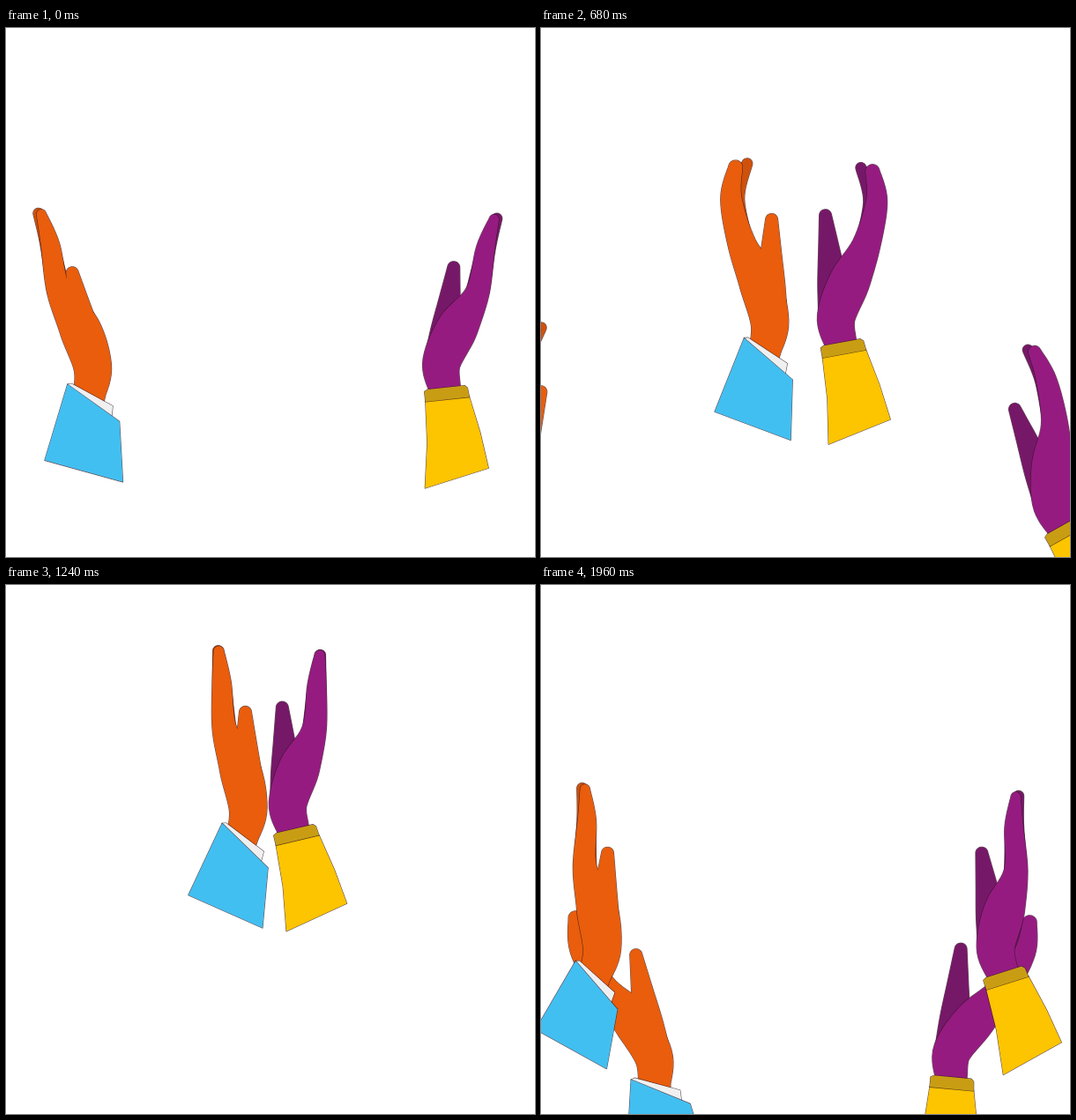
Write an HTML page with a canvas that moves like this. It is 600 px wide and 600 px high and loops after 2000 ms.

```html
<!DOCTYPE html>
<html lang="en">
<head>
<meta charset="utf-8">
<title>Clapping hands</title>
<style>
html, body { margin: 0; width: 100%; height: 100%; overflow: hidden; background: #fff; }
canvas { display: block; width: 600px; height: 600px; }
</style>
</head>
<body>
<canvas id="stage" width="600" height="600"></canvas>
<script>
const ctx = document.getElementById('stage').getContext('2d');
const SIZE = 600, LOOP = 2000, STEP = 40;
const EDGE = 'rgba(45,20,30,.75)';
const BONES = [32, 46, 48, 53, 36];

// Path of the left wrist. tilt turns the whole arm, drag curls the fingers.
const KEYS = [
  { t: 320, x: -140, y: 730, tilt: 43, drag: 1 },
  { t: 520, x: -60, y: 593, tilt: 43, drag: 1 },
  { t: 760, x: -36, y: 529, tilt: 43, drag: 0.4 },
  { t: 840, x: 1, y: 494, tilt: 39, drag: 0.2 },
  { t: 960, x: 61, y: 443, tilt: 29, drag: 0 },
  { t: 1040, x: 130, y: 387, tilt: 4.5, drag: 0 },
  { t: 1280, x: 275, y: 280, tilt: 26, drag: 0.2 },
  { t: 1480, x: 272, y: 326, tilt: 28, drag: 0.9 },
  { t: 1520, x: 272, y: 326, tilt: 28, drag: 0.9 },
  { t: 1760, x: 237, y: 400, tilt: 15, drag: 1 },
  { t: 1960, x: 129, y: 566, tilt: 2, drag: 1 },
  { t: 2120, x: -10, y: 700, tilt: -4, drag: 1 }
];

// Cuffs are drawn around the wrist, both as left hands
const orange = {
  skin: '#e95d0c', shade: '#cf510c', thumb: '#e95d0c',
  reach: 1, lean: -32, thumbTurn: 0,
  offset: () => [0, 0],
  cuffTilt: tilt => tilt,
  cuff: [
    ['#f0f0f0', [[-27, -4], [-23, -6], [29, 6], [31, 18], [13, 20]]],
    ['#42bff1', [[-27, -4], [41, 21], [63, 86], [-29, 86]]]
  ]
};

const purple = {
  skin: '#951b81', shade: '#761868', thumb: '#761868',
  reach: 0.95, lean: -38, thumbTurn: 5, mirror: true,
  offset: u => {
    const early = Math.max(0, Math.min(1, (1010 - u) / 250));
    return [6 + 48 * early, 22 * early - 7];
  },
  cuffTilt: tilt => 0.85 * tilt - 7,
  cuff: [
    ['#fdc400', [[23, 12], [-27, 12], [-35, 54], [-40, 95], [34, 110], [26, 59]]],
    ['#c99d13', [[23, 1], [19, -1], [-23, -1], [-26, 2], [-27, 12.5], [23, 12.5]]]
  ]
};

// Cubic through the keys that never overshoots
function ease(name, u) {
  const last = KEYS.length - 1;
  let i = 0;
  while (i < last - 1 && u >= KEYS[i + 1].t) i++;
  const slope = k => (KEYS[k + 1][name] - KEYS[k][name]) / (KEYS[k + 1].t - KEYS[k].t);
  const tangent = k => {
    if (k === 0) return slope(0);
    if (k === last) return slope(last - 1);
    const a = slope(k - 1), b = slope(k);
    return a * b <= 0 ? 0 : 2 * a * b / (a + b);
  };
  const from = KEYS[i], to = KEYS[i + 1];
  const h = to.t - from.t, s = (u - from.t) / h, r = 1 - s;
  return from[name] * r * r * (1 + 2 * s) + to[name] * s * s * (3 - 2 * s) +
    h * s * r * (tangent(i) * r - tangent(i + 1) * s);
}

const rad = deg => deg * Math.PI / 180;
const mix = (a, b, s) => a + (b - a) * s;
const step = (p, deg, len) => [p[0] + Math.sin(rad(deg)) * len, p[1] - Math.cos(rad(deg)) * len];

function turn(x, y, deg, p) {
  const c = Math.cos(rad(deg)), s = Math.sin(rad(deg));
  return [x + p[0] * c - p[1] * s, y + p[0] * s + p[1] * c];
}

function polygon(points) {
  const path = new Path2D();
  points.forEach(p => path.lineTo(p[0], p[1]));
  path.closePath();
  return path;
}

function spline(a, b, c, d, s) {
  return 0.5 * (2 * b + (c - a) * s + (2 * a - 5 * b + 4 * c - d) * s * s +
    (3 * b - a - 3 * c + d) * s * s * s);
}

// Tapered limb with a round end along points [x, y, radius]
function limb(points) {
  const n = points.length, line = [], left = [], right = [], cap = [];
  const at = i => points[Math.max(0, Math.min(n - 1, i))];
  for (let i = 0; i < n - 1; i++) {
    for (let j = 0; j < 8; j++) {
      line.push([0, 1, 2].map(k => spline(at(i - 1)[k], at(i)[k], at(i + 1)[k], at(i + 2)[k], j / 8)));
    }
  }
  line.push(points[n - 1]);
  line.forEach((p, i) => {
    const a = line[Math.max(0, i - 1)], b = line[Math.min(line.length - 1, i + 1)];
    const dir = Math.atan2(b[1] - a[1], b[0] - a[0]);
    const nx = Math.sin(dir) * p[2], ny = -Math.cos(dir) * p[2];
    left.push([p[0] + nx, p[1] + ny]);
    right.unshift([p[0] - nx, p[1] - ny]);
    if (i === line.length - 1) {
      for (let k = 1; k < 10; k++) {
        const w = dir - Math.PI / 2 + Math.PI * k / 10;
        cap.push([p[0] + Math.cos(w) * p[2], p[1] + Math.sin(w) * p[2]]);
      }
    }
  });
  return polygon([...left, ...cap, ...right]);
}

function paint(color, ...paths) {
  ctx.strokeStyle = EDGE;
  ctx.lineWidth = 1.2;
  ctx.lineJoin = 'round';
  paths.forEach(p => ctx.stroke(p));
  ctx.fillStyle = color;
  paths.forEach(p => ctx.fill(p));
}

// Directions of the bones from wrist to fingertip
function bend(tilt, drag, lean) {
  const knuckle = 0.95 * tilt - 44;
  const finger = knuckle + 19 - 8 * drag;
  return [0.65 * tilt - 4, 0.85 * tilt + lean, knuckle, finger, finger - 6 + 28 * drag];
}

function drawHand(hand, u) {
  const tilt = ease('tilt', u), drag = ease('drag', u);
  const [dx, dy] = hand.offset(u);
  const x = ease('x', u) + dx, y = ease('y', u) + dy;
  const cuffTilt = hand.cuffTilt(tilt);

  const joints = [turn(x, y, cuffTilt, [2, 14]), [x, y]];
  bend(tilt, drag, hand.lean).forEach((deg, i) => {
    joints.push(step(joints[i + 1], deg, BONES[i] * hand.reach));
  });
  const radii = [17, 18, 21.5, 23, 13.5 + 2.5 * drag, 10.5 + 1.5 * drag, 5.5 + 2.5 * drag];
  const spine = joints.map((p, i) => [p[0], p[1], radii[i]]);
  const [, , heel, , knuckle, mid, tip] = spine;

  const thumbDir = mix(1.15 * tilt - 30, 0.6 * tilt - 11, drag) + hand.thumbTurn;
  const thumb = limb([20, 17, 12, 7].map((r, i) =>
    [...step(heel, thumbDir, (108 + 8 * drag) * i / 3), r]));

  const spread = 1.3 * drag - 0.25;
  const back = limb([
    [knuckle[0], knuckle[1], 13],
    [mid[0] + 5 * spread, mid[1], 10],
    [tip[0] + 13 * spread, tip[1] - 4 * Math.abs(spread), 6]
  ]);
  const front = limb(spine);

  ctx.save();
  if (hand.mirror) ctx.transform(-1, 0, 0, 1, SIZE, 0);
  paint(hand.shade, back);
  if (hand.thumb === hand.skin) {
    paint(hand.skin, thumb, front);
  } else {
    paint(hand.thumb, thumb);
    paint(hand.skin, front);
  }
  hand.cuff.forEach(([color, shape]) => paint(color, polygon(shape.map(p => turn(x, y, cuffTilt, p)))));
  ctx.restore();
}

// Two pairs share one path, half a loop apart; the pair on its way out lies behind
function draw(t) {
  ctx.fillStyle = '#fff';
  ctx.fillRect(0, 0, SIZE, SIZE);
  const ages = [t, t < 1120 ? t + 1000 : t - 1000];
  ages.sort((a, b) => b - a);
  ages.filter(u => u >= KEYS[0].t).forEach(u => {
    drawHand(purple, u);
    drawHand(orange, u);
  });
}

function frame() {
  const t = performance.now() % LOOP;
  draw(Math.floor(t / STEP) * STEP);
  requestAnimationFrame(frame);
}
frame();
</script>
</body>
</html>
```
